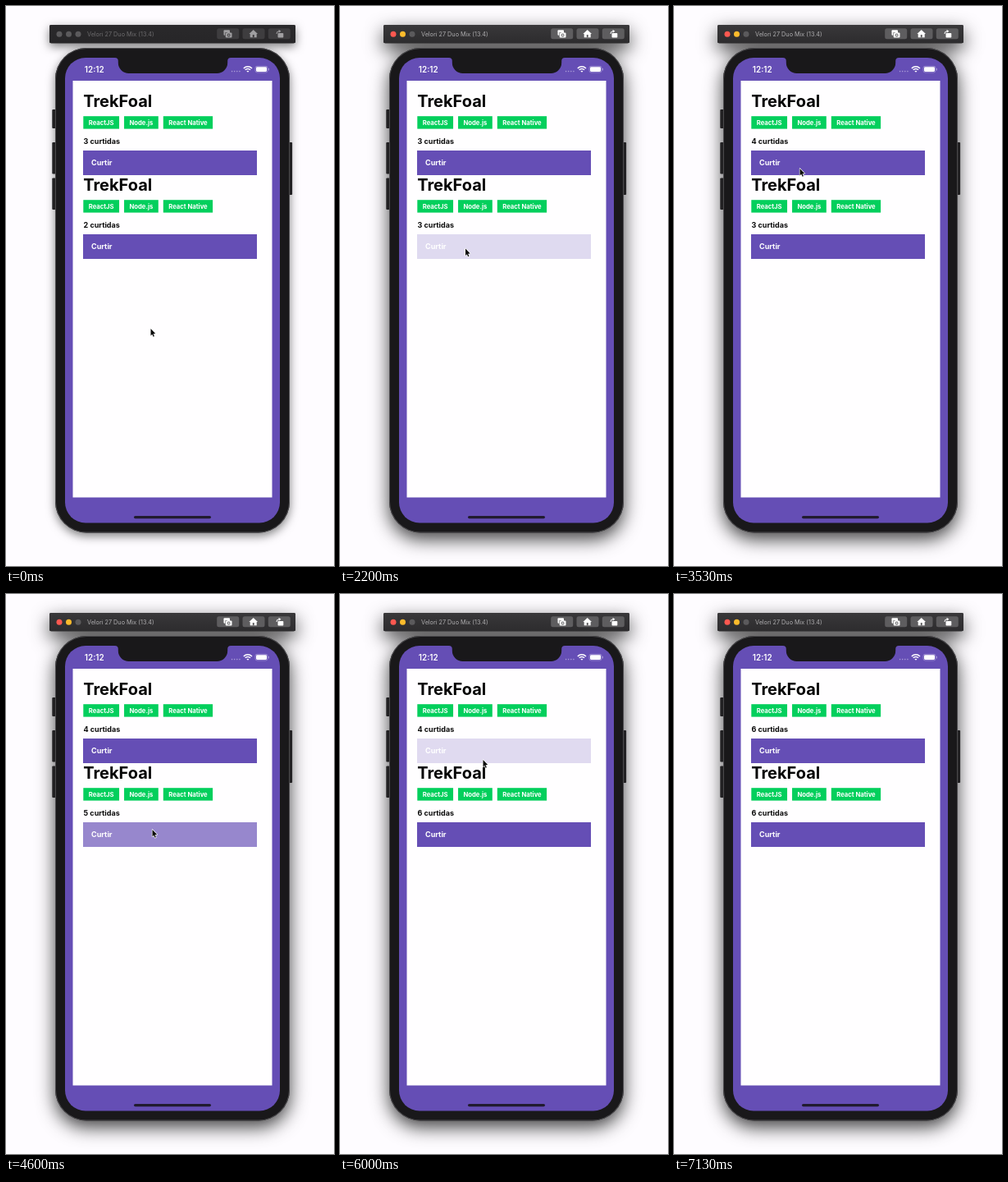
An HTML page with a canvas that plays this animation: 400 px wide and 682 px high, repeating every 7540 ms.

```html
<!DOCTYPE html>
<html lang="pt">
<head>
<meta charset="utf-8">
<title>Curtidas</title>
<style>
  html, body { margin: 0; width: 100%; height: 100%; overflow: hidden; background: #fefcff; }
  canvas { display: block; width: 400px; height: 682px; }
</style>
</head>
<body>
<canvas id="stage"></canvas>
<script>
const W = 400, H = 682, LOOP = 7540, STEP = 1000 / 15;
const ACTIVE_AT = 730, CURSOR_GONE = 7130;
const PRESS_MS = 100, RELEASE_MS = 300, PRESSED = .2;
const PAPER = '#fefcff', PURPLE = '#654eb5', GREEN = '#03cf5c', BODY = '#19181a';
const FONT = 'Inter, "Open Sans", sans-serif';
const TAGS = ['ReactJS', 'Node.js', 'React Native'];

const canvas = document.getElementById('stage');
const ctx = canvas.getContext('2d');
const dpr = window.devicePixelRatio || 1;
canvas.width = W * dpr;
canvas.height = H * dpr;

// taps: [finger down, finger up]
const cards = [
  { likes: 3, taps: [[2960, 3170], [5780, 6030], [6090, 6170]] },
  { likes: 2, taps: [[2030, 2190], [4260, 4340], [4390, 4440], [4800, 4960]] }
];

// pointer moves: [start, end, x, y]
const home = [176.5, 393];
const moves = [
  [1130, 2030, 153, 295.5],
  [2640, 2930, 153.5, 198],
  [3560, 4200, 178.5, 287],
  [5000, 5270, 174.5, 202],
  [6500, 7070, 235, 235]
];

const lerp = (a, b, p) => a + (b - a) * p;

function ease(p) {
  p = Math.min(1, Math.max(0, p));
  return p * p * (3 - 2 * p);
}

function pointerAt(t) {
  return moves.reduce(([x, y], [from, to, nx, ny]) => {
    const p = ease((t - from) / (to - from));
    return [lerp(x, nx, p), lerp(y, ny, p)];
  }, home);
}

// Dims while held, then recovers until the next tap
function opacityAt(taps, t) {
  return taps.reduce((v, [down, up], i) => {
    const next = taps[i + 1];
    const end = next ? Math.min(t, next[0]) : t;
    v = lerp(v, PRESSED, ease((Math.min(end, up) - down) / PRESS_MS));
    return lerp(v, 1, ease((end - up) / RELEASE_MS));
  }, 1);
}

function rect(x, y, w, h, color) {
  ctx.fillStyle = color;
  ctx.fillRect(x, y, w, h);
}

function round(x, y, w, h, r, color) {
  ctx.beginPath();
  ctx.roundRect(x, y, w, h, r);
  ctx.fillStyle = color;
  ctx.fill();
}

function dot(x, y, r, color) {
  ctx.beginPath();
  ctx.arc(x, y, r, 0, 7);
  ctx.fillStyle = color;
  ctx.fill();
}

function poly(points, color) {
  ctx.beginPath();
  points.forEach(([x, y]) => ctx.lineTo(x, y));
  ctx.closePath();
  ctx.fillStyle = color;
  ctx.fill();
}

function text(str, x, y, size, weight, color) {
  ctx.font = `${weight} ${size}px ${FONT}`;
  ctx.fillStyle = color;
  ctx.fillText(str, x, y);
}

function windowShadow(active) {
  ctx.save();
  ctx.shadowColor = `rgba(0,0,0,${active ? .74 : .5})`;
  ctx.shadowBlur = (active ? 22 : 12) * dpr;
  ctx.shadowOffsetY = (active ? 8 : 4) * dpr;
  ctx.beginPath();
  ctx.roundRect(53, 23, 300, 22.3, 2);
  ctx.roundRect(60, 51, 286, 590.5, 38);
  ctx.fillStyle = BODY;
  ctx.fill();
  ctx.restore();
}

function titleBar(active) {
  const grad = ctx.createLinearGradient(0, 23, 0, 45);
  grad.addColorStop(0, active ? '#39383a' : '#2a292b');
  grad.addColorStop(1, active ? '#2d2c2e' : '#272628');
  round(53, 23, 300, 22.3, 2, grad);

  const grey = '#5b5a5c';
  const lights = active ? ['#fe5850', '#fdbb2c', grey] : [grey, grey, grey];
  lights.forEach((color, i) => dot(65 + i * 11.5, 34.2, 3.5, color));
  text('Velori 27 Duo Mix (13.4)', 99, 37, 7.25, 400, active ? '#aeadaf' : '#6c6b6d');

  const face = active ? '#5e5d5f' : '#3e3d3f', icon = active ? '#fff' : '#a09fa1';
  for (let i = 0; i < 3; i++) round(257.2 + i * 31.3, 27.3, 27, 13, 2.5, face);
  cameraIcon(icon, face);
  houseIcon(icon, face);
  rotateIcon(icon);
}

function cameraIcon(icon, face) {
  round(265.5, 29.2, 7.5, 6.5, 1, icon);
  round(267.2, 32, 8.6, 6.8, 1, face);
  round(267.7, 32.5, 7.8, 6, 1, icon);
  round(269.8, 31.4, 3.4, 2, .8, icon);
  dot(271.6, 35.5, 1.9, face);
  dot(271.6, 35.5, 1.1, icon);
}

function houseIcon(icon, face) {
  poly([[301.7, 29], [307, 34], [296.4, 34]], icon);
  rect(297.7, 33.5, 8, 4.8, icon);
  rect(300.8, 35, 1.9, 3.3, face);
}

function rotateIcon(icon) {
  round(331.5, 33, 6.8, 5.6, .8, icon);
  ctx.strokeStyle = icon;
  ctx.lineWidth = 1;
  ctx.beginPath();
  ctx.moveTo(330, 34);
  ctx.quadraticCurveTo(329.6, 30.8, 333, 30.8);
  ctx.stroke();
  poly([[332.6, 28.8], [335.4, 30.8], [332.6, 32.8]], icon);
}

function phone() {
  const key = '#222123';
  round(56.3, 126, 5, 23, 1, key);
  round(56.3, 166, 5, 38.5, 1, key);
  round(56.3, 209.5, 5, 38.5, 1, key);
  round(344.5, 166, 4.6, 64, 1, key);

  round(60, 51, 286, 590.5, 38, '#4c4b4e');
  round(61, 52, 284, 588.5, 37, BODY);
  round(72, 63, 262, 566.5, 25, PURPLE);
  notch(136.8, 270.2, 63, 82);
  statusBar();
  rect(81.5, 91, 243, 507.5, '#fffeff');
  round(156, 621, 94, 3.2, 1.6, '#211b2f');
}

function notch(left, right, top, bottom) {
  const flare = 4, r = 13;
  ctx.beginPath();
  ctx.moveTo(left - flare, top - 1);
  ctx.lineTo(left - flare, top);
  ctx.arcTo(left, top, left, top + flare, flare);
  ctx.arcTo(left, bottom, left + r, bottom, r);
  ctx.arcTo(right, bottom, right, bottom - r, r);
  ctx.arcTo(right, top, right + flare, top, flare);
  ctx.lineTo(right + flare, top - 1);
  ctx.fillStyle = BODY;
  ctx.fill();
}

function statusBar() {
  const faint = '#a99bd7';
  text('12:12', 95.8, 81, 9.9, 600, '#fff');
  for (let i = 0; i < 4; i++) dot(275.6 + i * 3.1, 79.6, .8, faint);

  // wifi: a wedge and two arcs
  ctx.strokeStyle = '#fff';
  ctx.lineWidth = 1.5;
  for (const r of [1.4, 4.5, 7.2]) {
    ctx.beginPath();
    ctx.arc(294.9, 81, r, -Math.PI * .75, -Math.PI * .25);
    ctx.stroke();
  }

  ctx.beginPath();
  ctx.roundRect(304, 73.3, 15, 7.6, 2.2);
  ctx.strokeStyle = faint;
  ctx.lineWidth = .7;
  ctx.stroke();
  round(305, 74.3, 13, 5.6, 1.3, '#fff');
  round(319.8, 75.8, 1, 2.6, .5, faint);
}

function tagRow(x, y) {
  const size = 7.7, pad = 6.4, gap = 6;
  for (const label of TAGS) {
    ctx.font = `700 ${size}px ${FONT}`;
    const w = ctx.measureText(label).width + pad * 2;
    rect(x, y, w, 15.4, GREEN);
    text(label, x + pad, y + 10.5, size, 700, '#fff');
    x += w + gap;
  }
}

function card({ likes, taps }, y, t) {
  const count = likes + taps.filter(([, up]) => up <= t).length;
  ctx.save();
  ctx.translate(0, y);
  text('TrekFoal', 94.2, 32, 20, 700, '#050505');
  tagRow(94.3, 43.2);
  text(count + ' curtidas', 94.6, 76.5, 9, 700, '#0a0a0a');
  ctx.globalAlpha = opacityAt(taps, t);
  rect(94, 85, 212, 30, PURPLE);
  ctx.globalAlpha = 1;
  text('Curtir', 104, 103, 9, 700, '#fff');
  ctx.restore();
}

function cursor([x, y]) {
  ctx.save();
  ctx.translate(x, y);
  ctx.strokeStyle = '#fff';
  ctx.lineWidth = 1.3;
  ctx.lineJoin = 'round';
  poly([[0, 0], [0, 8.4], [1.8, 6.7], [3.1, 9.8], [4.4, 9.3], [3.1, 6.2], [5.7, 6]], '#0a0a0a');
  ctx.stroke();
  ctx.fill();
  ctx.restore();
}

function draw(t) {
  const active = t >= ACTIVE_AT;
  ctx.setTransform(dpr, 0, 0, dpr, 0, 0);
  rect(0, 0, W, H, PAPER);
  windowShadow(active);
  titleBar(active);
  phone();
  cards.forEach((c, i) => card(c, 91 + i * 102, t));
  if (t < CURSOR_GONE) cursor(pointerAt(t));
}

const start = performance.now();
function tick() {
  const t = (performance.now() - start) % LOOP;
  // the picture advances 15 times a second
  draw(Math.floor((t + 5) / STEP) * STEP);
  requestAnimationFrame(tick);
}
tick();
</script>
</body>
</html>
```
